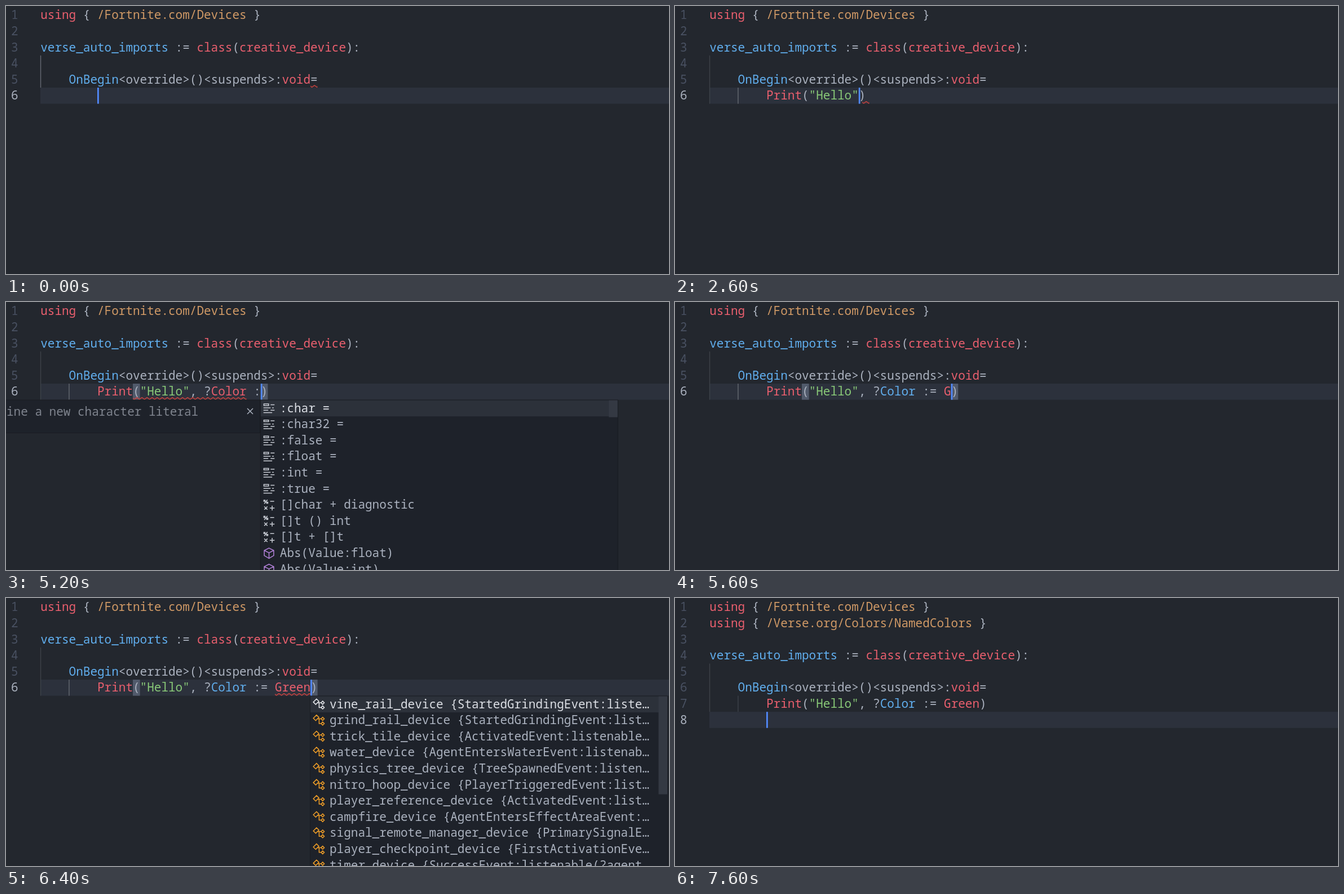
Write an HTML page that moves like this. It is 1176 px wide and 476 px high and loops after 8000 ms.

```html
<!DOCTYPE html>
<html lang="en">
<head>
<meta charset="utf-8">
<title>Code editor</title>
<style>
  html, body { margin: 0; width: 100%; height: 100%; overflow: hidden; background: #23272e; }
  svg { display: block; width: 100%; height: 100%; }
  text { font: 21px "Noto Sans Mono", "DejaVu Sans Mono", monospace; white-space: pre; }
</style>
</head>
<body>
<svg viewBox="0 0 1176 476">
  <defs>
    <pattern id="wave" width="9" height="5" patternUnits="userSpaceOnUse">
      <path d="M-1.9 .8 2.6 4 7.1 .8 11.6 4" fill="none" stroke="#d0433f" stroke-width="1.5"/>
    </pattern>
  </defs>
  <g id="view"></g>
</svg>
<script>
const LOOP = 8000, LEFT = 61.2, CHAR = 12.6, ROW = 28.6;
const C = { r: '#ea5f6e', b: '#61afef', o: '#d19a66', g: '#89ca78', w: '#abb2bf' };
const view = document.getElementById('view');

const colX = c => LEFT + c * CHAR;
const rowY = r => 2 + r * ROW;
const esc = s => s.replace(/&/g, '&amp;').replace(/</g, '&lt;');
const rect = (x, y, w, h, fill) => `<rect x="${x}" y="${y}" width="${w}" height="${h}" fill="${fill}"/>`;
const text = (x, y, s, fill) => `<text x="${x}" y="${y}" fill="${fill}">${esc(s)}</text>`;
const line = (row, col, tokens) => `<text x="${colX(col)}" y="${rowY(row) + 21.3}">` +
  tokens.map(([c, s]) => `<tspan fill="${C[c]}">${esc(s)}</tspan>`).join('') + '</text>';
const squiggle = (row, a, b) => `<g transform="translate(${colX(a)} ${rowY(row) + 23.8})">` +
  rect(0, 0, (b - a) * CHAR, 5, 'url(#wave)') + '</g>';
const guide = (col, row, rows, active) =>
  rect(colX(col) - .4, rowY(row), 1.4, rows * ROW, active ? '#656a73' : '#3d4249');

const using = path => [['r', 'using'], ['w', ' { '], ['o', path], ['w', ' }']];
const classLine = [['b', 'verse_auto_imports'], ['w', ' := '], ['r', 'class'], ['w', '('],
  ['r', 'creative_device'], ['w', '):']];
const beginLine = [['b', 'OnBegin'], ['w', '<override>()<suspends>:'], ['r', 'void'], ['w', '=']];

function tokenize(code) {
  return code.match(/"[^"]*"?|[A-Za-z]+|[^"A-Za-z]+/g)?.map(s => [
    s[0] === '"' ? 'g' : s === 'Color' && code.includes(':=') ? 'b' : /[A-Za-z]/.test(s) ? 'r' : 'w', s
  ]) || [];
}

// Completion list
const ICONS = {
  word: ['#c8ccd4', 'M1.5 2.5h6v2h-6zM10 3.5h5M1 7.5h9M12 7.5h2M1 10.5h6M10 10.5h5M1 13.5h11'],
  op: ['#c8ccd4', 'M2 6.5 6 1.5M1.5 2h1.5v1.5H1.5zM5 4.5h1.5V6H5zM9.5 3.5h5M2 10l4 4M6 10l-4 4M9 12h6M12 9v6'],
  cube: ['#b180d7', 'M8 1.5 14 4.5V11L8 14.5 2 11V4.5zM2 4.5 8 7.5 14 4.5M8 7.5v7'],
  type: ['#ee9d28', 'M1.2 5.2 5.2 1.2 8.2 4.2 4.2 8.2zM6.5 6H11M8.5 6v6H11M11 6l2-2 2 2-2 2zM11 12l2-2 2 2-2 2z']
};
const EVENTS = {
  trick_tile: 'Activated', vine_rail: 'StartedGrinding', grind_rail: 'StartedGrinding',
  water: 'AgentEntersWater', nitro_hoop: 'PlayerTriggered', physics_tree: 'TreeSpawned',
  player_reference: 'Activated', switch: 'TurnedOn', bouncer: 'Bounced',
  campfire: 'AgentEntersEffectArea', teleporter: 'Enter', timer: 'Success',
  signal_remote_manager: 'PrimarySignal', player_checkpoint: 'FirstActivation'
};
const devices = names => names.split(' ').map(n => {
  const arg = /bouncer|timer/.test(n) ? '?agent' : 'agent';
  return ['type', `${n}_device {${EVENTS[n]}Event:listenable(${arg})}`.slice(0, 44) + '…'];
});
const LISTS = {
  types: [
    ...['char', 'char32', 'false', 'float', 'int', 'true'].map(s => ['word', `:${s} =`]),
    ...['[]char + diagnostic', '[]t () int', '[]t + []t'].map(s => ['op', s]),
    ...['float', 'int'].map(s => ['cube', `Abs(Value:${s})`])
  ],
  gre: devices('trick_tile vine_rail grind_rail water nitro_hoop physics_tree player_reference switch bouncer campfire teleporter'),
  green: devices('vine_rail grind_rail trick_tile water physics_tree nitro_hoop player_reference campfire signal_remote_manager player_checkpoint timer')
};

function popup(x, name, thumb) {
  const top = 174.6;
  let out = rect(x - 1, top - 1, 635, 310, '#191c22') + rect(x, top, 633, 310, '#1e222a') +
    rect(x, top, 633, ROW, '#2c313a') + rect(x + 617.5, top, 15.5, thumb, '#343943');
  LISTS[name].forEach(([kind, label], i) => {
    const y = top + i * ROW, [color, d] = ICONS[kind];
    out += `<path transform="translate(${x + 3.5} ${y + 3}) scale(1.4)" d="${d}" fill="none" ` +
      `stroke="${i ? color : kind === 'type' ? '#e4e6ea' : color}" stroke-width="1.1"/>` +
      text(x + 34, y + 21, label, i ? C.w : '#dcdfe5');
  });
  return out;
}

const details = () => rect(0, 173.6, 451, 59.4, '#191c22') + rect(0, 174.6, 450, 57.4, '#1e222a') +
  text(1, 201.5, 'ine a new character literal', '#7f848e') +
  '<path d="M428 189l10 10M438 189l-10 10" stroke="#abb2bf" stroke-width="1.5"/>';

// [time, code with | as caret, options]; wave is a column range, list is [name, thumb height]
const CALL = 'Print("Hello"', ARG = CALL + ', ?Color';
const STEPS = [
  [0, '|', { rowWave: 1 }],
  [200, 'P|', { rowWave: 1 }],
  [400, 'Pr|'], [600, 'Pri|'], [800, 'Prin|'], [1000, 'Print|'], [1200, 'Print(|)'],
  [1400, 'Print("|")'], [1600, 'Print("H|")'], [1800, 'Print("He|")'], [2000, 'Print("Hel|")'],
  [2200, 'Print("Hell|")'],
  [2400, 'Print("Hell|")', { wave: [20.5, 21.5] }],
  [2600, CALL + '|)', { wave: [21.5, 22.5], plain: 1 }],
  [2800, CALL + '|)'], [3200, CALL + ',|)'], [3400, CALL + ', |)'],
  [3800, CALL + ', ?|)', { wave: [23.5, 24.5] }],
  [4000, CALL + ', ?C|)', { wave: [23.5, 24.5] }],
  [4200, CALL + ', ?Col|)', { wave: [23.5, 24.5] }],
  [4400, ARG + '|)', { wave: [23.5, 24.5] }],
  [4600, ARG + ' |)', { wave: [13, 29] }],
  [4800, ARG + ' :|)', { wave: [13, 29] }],
  [5000, ARG + ' :|)', { wave: [13, 29], list: ['types', 30] }],
  [5200, ARG + ' :|)', { wave: [13, 29], list: ['types', 30], details: 1 }],
  [5400, ARG + ' :=|)'],
  [5600, ARG + ' := G|)'],
  [5800, ARG + ' := Gr|)', { wave: [33, 34], list: ['gre', 90] }],
  [6000, ARG + ' := Gre|)', { wave: [33, 34], list: ['gre', 119] }],
  [6200, ARG + ' := Gree|)', { wave: [33, 36], list: ['green', 150] }],
  [6400, ARG + ' := Green|)', { wave: [33, 38], list: ['green', 174] }],
  [6600, ARG + ' := Green|)', { imported: 1, wave: [33, 38] }],
  [6800, ARG + ' := Green|)', { imported: 1 }],
  [7200, ARG + ' := Green)|', { imported: 1 }],
  [7600, ARG + ' := Green)|', { imported: 1, newline: 1 }]
];

function render([, marked, o = {}]) {
  const shift = o.imported ? 1 : 0, row = 5 + shift;
  const caretRow = row + (o.newline ? 1 : 0);
  const code = marked.replace('|', ''), caret = 8 + marked.indexOf('|');
  const caretX = colX(o.newline ? 8 : caret), y = rowY(caretRow);
  let out = rect(61, y, 1115, ROW, '#2c313c');

  out += guide(0, 3 + shift, code ? 3 : 2, !code);
  if (code) out += guide(4, row, 1, !o.newline);

  if (!o.newline && !o.plain && /\|\)|\)\|/.test(marked))
    for (const c of [13, 8 + code.length - 1]) out += rect(colX(c), y, CHAR, ROW, '#515a6b');

  for (let i = 0; i <= caretRow; i++)
    out += text(9, rowY(i) + 21.3, String(i + 1), i === caretRow ? C.w : '#495162');

  out += line(0, 0, using('/Fortnite.com/Devices'));
  if (shift) out += line(1, 0, using('/Verse.org/Colors/NamedColors'));
  out += line(2 + shift, 0, classLine) + line(4 + shift, 4, beginLine) + line(row, 8, tokenize(code));

  if (o.rowWave) out += squiggle(4, 38, 39);
  if (o.wave) out += squiggle(row, ...o.wave);
  out += rect(caretX, y, 2.7, ROW, '#528bff');
  if (o.details) out += details();
  if (o.list) out += popup(caretX, ...o.list);
  view.innerHTML = out;
}

let shown;
function frame(now) {
  const t = now % LOOP;
  const step = STEPS.findLast(s => s[0] <= t);
  if (step !== shown) render(shown = step);
  requestAnimationFrame(frame);
}
render(shown = STEPS[0]);
requestAnimationFrame(frame);
</script>
</body>
</html>
```
